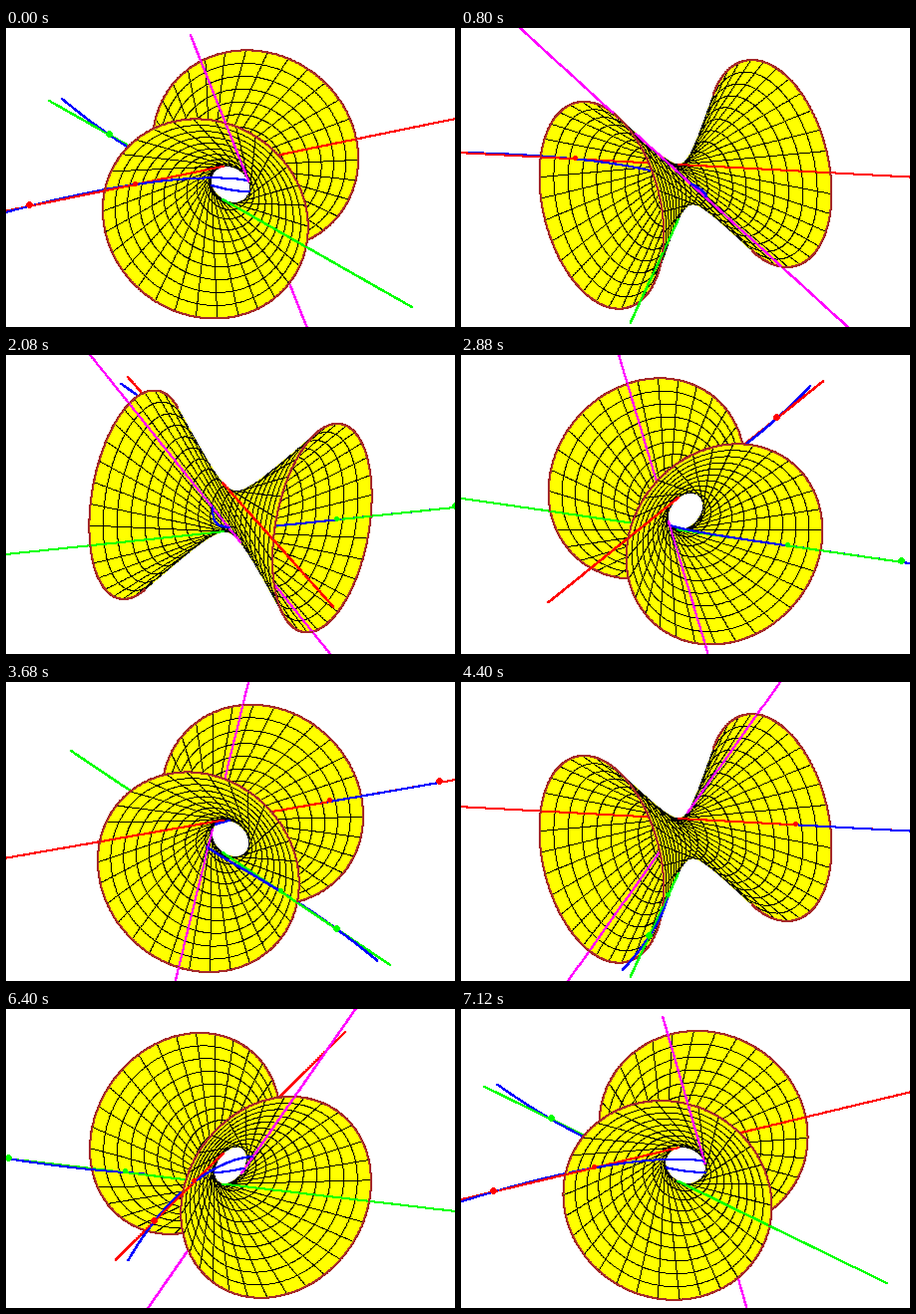
A matplotlib script that plays this animation: 450x300 px, repeating every 7200 ms.

```python
import numpy as np
import matplotlib.pyplot as plt
from matplotlib.animation import FuncAnimation
from matplotlib.collections import PolyCollection

W, H, DPI = 450, 300, 100
FRAMES, INTERVAL = 90, 80
SCALE, CX, CY = 20.8, 225, 156.9
ELEV = np.radians(20)
EDGE = 5                            # the surface spans |u| <= EDGE
REACH = 12                          # half length of the straight lines

YELLOW = "#ffff00"
BLACK, BROWN = (0, 0, 0), (165, 42, 42)
RED, GREEN, BLUE, MAGENTA = (255, 0, 0), (0, 255, 0), (0, 0, 255), (255, 0, 255)


# World points are (u, v, z); the surface is v^2 + z^2 - u^2 = 1.
def ruling(theta, u):
    s, c = np.sin(theta), np.cos(theta)
    return np.stack([u, s - u * c, c + u * s], axis=-1)


def ring(u, theta):
    rho = np.sqrt(1 + u * u)
    return np.stack([u + 0 * theta, rho * np.sin(theta), rho * np.cos(theta)], axis=-1)


def cubic(t):
    """Space cubic that has all three coloured lines as secants."""
    u = (2.2 * t**3 + 6.8 * t) / 21
    v = 0.6 * t**2 - 1.6
    z = (t**3 - 37 * t) / 84
    return np.stack([u, v, z], axis=-1)


def project(p, a):
    """Screen position of points when the surface axis has heading a."""
    u, v, z = p[..., 0], p[..., 1], p[..., 2]
    right = u * np.cos(a) - v * np.sin(a)
    back = u * np.sin(a) + v * np.cos(a)
    up = back * np.sin(ELEV) + z * np.cos(ELEV)
    return np.stack([CX + SCALE * right, CY - SCALE * up], axis=-1)


def to_eye(a):
    c = np.cos(ELEV)
    return np.array([-c * np.sin(a), -c * np.cos(a), np.sin(ELEV)])


def visible(p, eye, eps):
    """True where no part of the surface lies between a point and the eye."""
    q = np.array([-1, 1, 1])
    A = (q * eye * eye).sum()
    B = (p * (q * eye)).sum(axis=-1)
    C = (p * p * q).sum(axis=-1) - 1
    disc = B * B - A * C
    root = np.sqrt(np.maximum(disc, 0))
    hidden = np.zeros(disc.shape, bool)
    for s in ((-B - root) / A, (-B + root) / A):
        hidden |= (disc > 0) & (s > eps) & (np.abs(p[..., 0] + s * eye[0]) <= EDGE)
    return ~hidden


def stamp(canvas, xy, color, brush):
    """Press a small pixel brush onto the canvas at every point, in order."""
    px = np.floor(xy).astype(int)[:, None, :] + brush
    color = np.broadcast_to(color, (len(xy), 3))
    color = np.repeat(color, len(brush), axis=0)
    x, y = px.reshape(-1, 2).T
    ok = (x >= 0) & (x < W) & (y >= 0) & (y < H)
    canvas[y[ok], x[ok], :3] = color[ok]
    canvas[y[ok], x[ok], 3] = 255


def disc(r):
    k = np.arange(-3, 4)
    dx, dy = np.meshgrid(k, k)
    inside = dx**2 + dy**2 <= r * r
    return np.stack([dx[inside], dy[inside] - 1], axis=-1)


DOT = np.array([[0, 0]])
SQUARE = np.array([[0, 0], [1, 0], [0, 1], [1, 1]])

# Skin patches
us = np.sinh(np.linspace(-np.arcsinh(EDGE), np.arcsinh(EDGE), 21))
th = np.linspace(0, 2 * np.pi, 49)
mesh = np.array([ring(u, th) for u in us])
patches = np.stack([mesh[:-1, :-1], mesh[1:, :-1], mesh[1:, 1:], mesh[:-1, 1:]],
                   axis=2).reshape(-1, 4, 3)

# Black net: straight rulings and rings, sampled about once per pixel
net_u = np.linspace(-EDGE, EDGE, 320)
net_t = np.linspace(0, 2 * np.pi, 640)
net = np.concatenate([ruling(t, net_u) for t in np.arange(30) * 2 * np.pi / 30]
                     + [ring(u, net_t) for u in np.arange(-4.5, 4.6, 0.5)])

# Thick lines: (points, colour)
long_u = np.linspace(-REACH, REACH, 800)
rim_t = np.linspace(0, 2 * np.pi, 720)
tubes = [(ring(-EDGE, rim_t), BROWN), (ring(EDGE, rim_t), BROWN),
         (ruling(0, long_u), RED), (ruling(np.pi, long_u), GREEN),
         (ruling(-np.pi / 2, long_u), MAGENTA),
         (cubic(np.linspace(-4.644, 4.644, 1800)), BLUE)]
wire = np.concatenate([p for p, _ in tubes])
tints = np.concatenate([[c] * len(p) for p, c in tubes])

# Beads where the cubic meets the lines: (parameter, colour, radius)
beads = [(-4, RED, 3.2), (-3, RED, 2.3), (3, GREEN, 2.3), (4, GREEN, 3.2)]

fig = plt.figure(figsize=(W / DPI, H / DPI), dpi=DPI, facecolor="white")
ax = fig.add_axes([0, 0, 1, 1])
skin = PolyCollection([], facecolors=YELLOW, edgecolors="none",
                      linewidths=0, antialiaseds=False, zorder=1)
ax.add_collection(skin)
ink = ax.imshow(np.zeros((H, W, 4), np.uint8), extent=(0, W, H, 0),
                aspect="auto", interpolation="nearest", zorder=2)
ax.set_xlim(0, W)
ax.set_ylim(H, 0)
ax.axis("off")


def draw(i):
    a = np.radians(76 - 4 * i)
    eye = to_eye(a)
    skin.set_verts(project(patches, a))

    canvas = np.zeros((H, W, 4), np.uint8)
    stamp(canvas, project(net[visible(net, eye, 0.02)], a), BLACK, DOT)

    # Nearer pieces are painted last
    order = np.argsort(wire @ eye, kind="stable")
    order = order[visible(wire, eye, 0.1)[order]]
    stamp(canvas, project(wire[order], a) - 0.5, tints[order], SQUARE)

    for t, color, radius in beads:
        p = cubic(np.array([float(t)]))
        if visible(p, eye, 0.12)[0]:
            stamp(canvas, project(p, a), color, disc(radius))

    ink.set_data(canvas)
    return skin, ink


anim = FuncAnimation(fig, draw, frames=FRAMES, interval=INTERVAL,
                     repeat=True, repeat_delay=0, blit=False)
plt.show()
```
